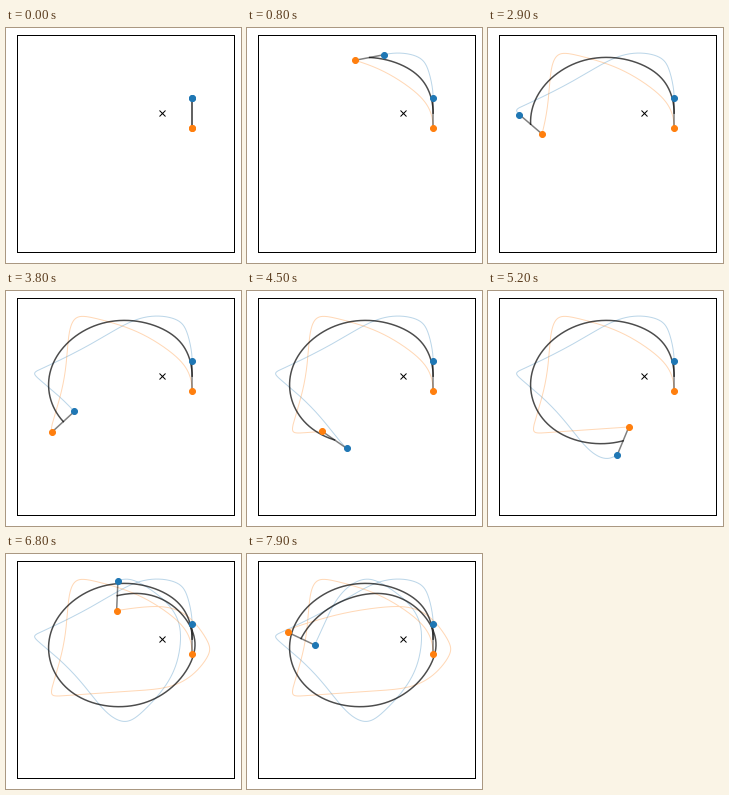
Recreate the animation shown at these times as a matplotlib script. Size 235x235 px, loop 8000 ms.

```python
import numpy as np
import matplotlib.pyplot as plt
from matplotlib.animation import FuncAnimation

# A rigid dumbbell of unit length orbiting a point mass (GM = 1).
SIZE, DPI = 235, 72
FRAMES, INTERVAL = 80, 100
FRAME_TIME = 0.4
SUBSTEPS = 20
SCALE = 29.88                       # pixels per length unit
ORIGIN = np.array([156.25, 85.15])  # attractor, pixels from the top left
LEFT, TOP, SIDE = 11.2, 7.2, 217.0


def rod(theta):
    return np.array([np.cos(theta), np.sin(theta)])


def derivative(state):
    x, y, theta, vx, vy, omega = state
    pos, u = np.array([x, y]), rod(theta)
    r1, r2 = pos + u / 2, pos - u / 2
    s1, s2 = (r1 @ r1) ** -1.5, (r2 @ r2) ** -1.5
    ax, ay = -(r1 * s1 + r2 * s2) / 2
    torque = -(u[0] * y - u[1] * x) * (s1 - s2)
    return np.array([vx, vy, omega, ax, ay, torque])


def rk4(state, h):
    k1 = derivative(state)
    k2 = derivative(state + h / 2 * k1)
    k3 = derivative(state + h / 2 * k2)
    k4 = derivative(state + h * k3)
    return state + h / 6 * (k1 + 2 * k2 + 2 * k3 + k4)


def simulate():
    states = [np.array([1, 0, np.pi / 2, 0, 1.2, 0])]
    for _ in range((FRAMES - 1) * SUBSTEPS):
        states.append(rk4(states[-1], FRAME_TIME / SUBSTEPS))
    return np.array(states)


path = simulate()
center = path[:, :2]
half = rod(path[:, 2]).T / 2
ends = [center + half, center - half]
colors = ["C0", "C1"]

fig = plt.figure(figsize=(SIZE / DPI, SIZE / DPI), dpi=DPI, facecolor="white")
ax = fig.add_axes([LEFT / SIZE, 1 - (TOP + SIDE) / SIZE, SIDE / SIZE, SIDE / SIZE])
ax.set_xlim((LEFT - ORIGIN[0]) / SCALE, (LEFT + SIDE - ORIGIN[0]) / SCALE)
ax.set_ylim((ORIGIN[1] - TOP - SIDE) / SCALE, (ORIGIN[1] - TOP) / SCALE)
ax.set_xticks([])
ax.set_yticks([])
for spine in ax.spines.values():
    spine.set_linewidth(1)


def add_dumbbell():
    bar, = ax.plot([], [], "k-", lw=1.5, alpha=0.5, zorder=3)
    dots = [ax.plot([], [], "o", color=c, ms=6, zorder=4)[0] for c in colors]
    return bar, dots


def place(dumbbell, i):
    bar, dots = dumbbell
    a, b = ends[0][i], ends[1][i]
    bar.set_data([a[0], b[0]], [a[1], b[1]])
    for dot, p in zip(dots, (a, b)):
        dot.set_data([p[0]], [p[1]])


ax.plot(0, 0, "kx", ms=6)
end_trails = [ax.plot([], [], color=c, lw=1, alpha=0.3)[0] for c in colors]
center_trail, = ax.plot([], [], "k-", lw=1.5, alpha=0.7)
start, mover = add_dumbbell(), add_dumbbell()
place(start, 0)


def update(frame):
    i = frame * SUBSTEPS
    for line, pts in zip(end_trails + [center_trail], ends + [center]):
        line.set_data(pts[:i + 1, 0], pts[:i + 1, 1])
    place(mover, i)
    return [*end_trails, center_trail, mover[0], *mover[1]]


anim = FuncAnimation(fig, update, frames=FRAMES, interval=INTERVAL,
                     repeat=True, repeat_delay=0, blit=False)
plt.show()
```
